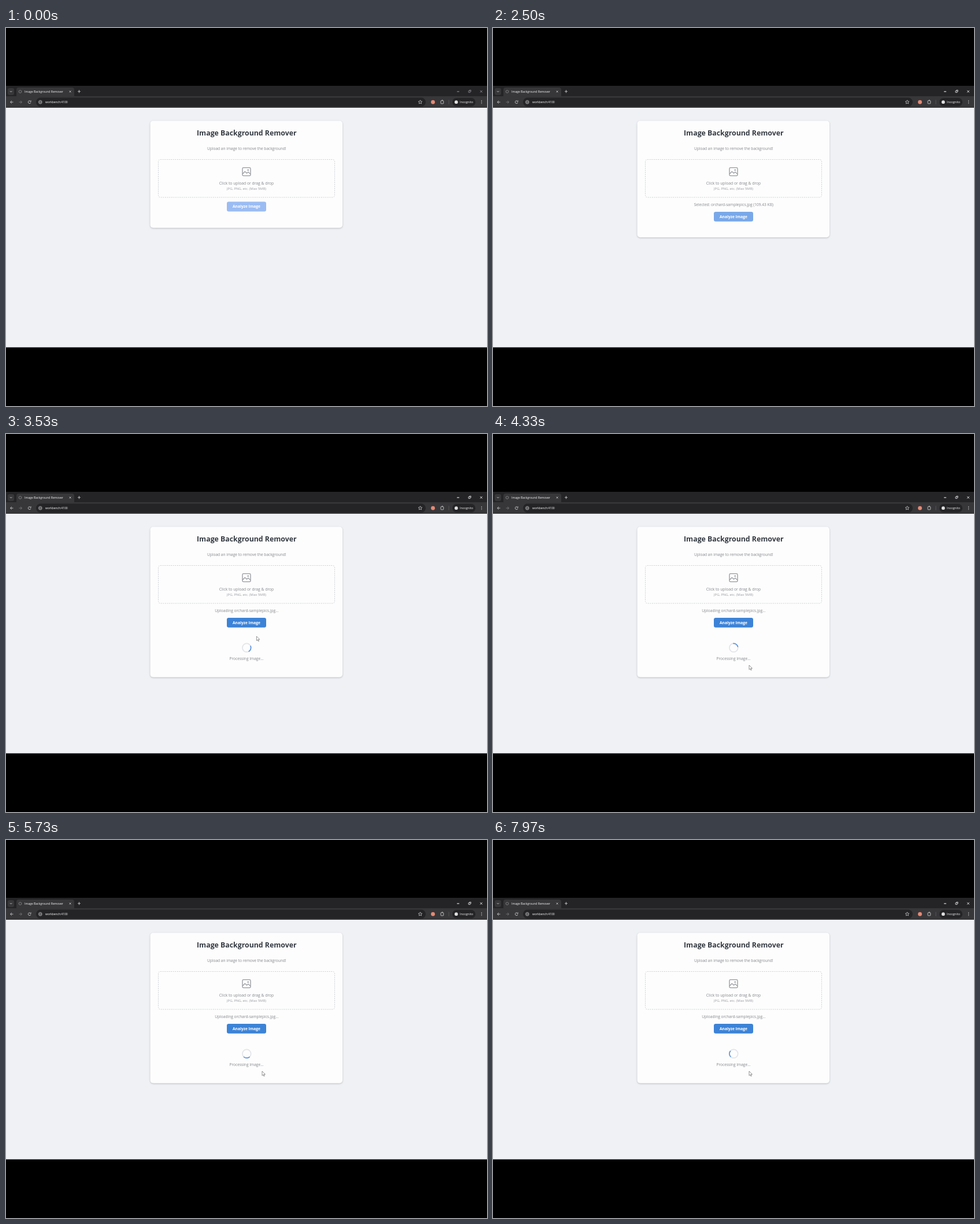
An HTML page with a canvas that plays this animation: 832x654 px, repeating every 8 s.

```html
<!DOCTYPE html>
<html lang="en">
<head>
<meta charset="utf-8">
<title>Image Background Remover</title>
<style>
html, body { margin: 0; width: 100%; height: 100%; overflow: hidden; background: #000; }
canvas { display: block; }
</style>
</head>
<body>
<canvas id="stage" width="832" height="654"></canvas>
<script>
const ctx = document.getElementById('stage').getContext('2d');
const LOOP = 8000;
const CHOSEN = 2430;   // file picked
const CLICK = 3230;    // upload starts
const FILE = 'orchard-samplepics.jpg';
const STRIP = '#242427';
const BAR = '#37373a';
const GREY = '#85878c';
const ICON = '#c8c8c8';

const clamp = v => Math.max(0, Math.min(1, v));
const progress = (t, from, to) => clamp((t - from) / (to - from));
const ease = p => p * p * (3 - 2 * p);
const mix = (a, b, p) => `rgb(${a.map((v, i) => Math.round(v + (b[i] - v) * p))})`;

function box(x, y, w, h, r, color) {
  ctx.beginPath();
  ctx.roundRect(x, y, w, h, r);
  ctx.fillStyle = color;
  ctx.fill();
}

function frame(x, y, w, h, r, color, width = 1) {
  ctx.beginPath();
  ctx.roundRect(x, y, w, h, r);
  ctx.strokeStyle = color;
  ctx.lineWidth = width;
  ctx.stroke();
}

function line(points, color, width = 1) {
  ctx.beginPath();
  points.forEach(([x, y], i) => i ? ctx.lineTo(x, y) : ctx.moveTo(x, y));
  ctx.strokeStyle = color;
  ctx.lineWidth = width;
  ctx.stroke();
}

function arc(x, y, r, color, width = 1, from = 0, to = Math.PI * 2) {
  ctx.beginPath();
  ctx.arc(x, y, r, from, to);
  ctx.strokeStyle = color;
  ctx.lineWidth = width;
  ctx.stroke();
}

function dot(x, y, r, color) {
  ctx.beginPath();
  ctx.arc(x, y, r, 0, Math.PI * 2);
  ctx.fillStyle = color;
  ctx.fill();
}

function text(str, x, y, size, color, weight = 400, align = 'center') {
  ctx.font = `${weight} ${size}px "Open Sans", "Noto Sans", sans-serif`;
  ctx.textAlign = align;
  ctx.fillStyle = color;
  ctx.fillText(str, x, y);
}

function cross(x, y, r, color) {
  line([[x - r, y - r], [x + r, y + r]], color, 0.8);
  line([[x + r, y - r], [x - r, y + r]], color, 0.8);
}

function arrow(x, y, dir, color) {
  line([[x - 2.5, y], [x + 2.5, y]], color, 0.9);
  line([[x, y - 2.4], [x + 2.5 * dir, y], [x, y + 2.4]], color, 0.9);
}

function star(x, y, r, color) {
  const pts = [];
  for (let i = 0; i <= 10; i++) {
    const a = i * Math.PI / 5 - Math.PI / 2;
    const d = i % 2 ? r * 0.48 : r;
    pts.push([x + d * Math.cos(a), y + d * Math.sin(a)]);
  }
  line(pts, color, 0.8);
}

function drawBrowser(t) {
  box(0, 100, 832, 18, 0, STRIP);
  box(3, 104, 11, 12, 3, BAR);
  line([[6.8, 109], [8.6, 110.8], [10.4, 109]], ICON, 0.9);

  box(0, 118, 832, 20, 0, BAR);
  box(18, 103, 100, 15, [4, 4, 0, 0], BAR);
  arc(24.5, 110, 2.3, '#858588', 0.9);
  text('Image Background Remover', 32, 112, 5.1, '#f4f4f4', 400, 'left');
  cross(111, 110, 1.5, ICON);
  line([[124, 109.8], [129, 109.8]], ICON, 0.9);
  line([[126.5, 107.3], [126.5, 112.3]], ICON, 0.9);

  const control = t < CHOSEN ? '#99999c' : '#fff';
  line([[780, 110], [784, 110]], control);
  frame(800, 108.6, 3, 3, 0.4, control, 0.8);
  line([[801.3, 107.4], [804.2, 107.4], [804.2, 110.3]], control, 0.7);
  cross(822, 109.8, 1.9, control);

  arrow(10, 128.2, -1, ICON);
  arrow(25, 128.2, 1, '#77777a');
  arc(40.7, 128.2, 2.4, ICON, 0.9, 0.3, 5.5);
  line([[43.2, 125.3], [43.2, 127.3], [41.2, 127.3]], ICON, 0.8);

  box(52, 120.5, 674, 15.5, 7.7, STRIP);
  dot(59.3, 128.2, 4.2, BAR);
  arc(59.3, 128.2, 2.6, ICON, 0.8);
  line([[58, 128.2], [60.6, 128.2]], ICON, 0.8);
  text('workbench:4100', 68, 130.2, 5, '#fff', 400, 'left');

  star(716.5, 128.2, 3.4, ICON);
  dot(738.5, 128.2, 3.4, '#e58a74');
  frame(752, 125.7, 4.8, 5.2, 0.8, ICON, 0.9);
  box(753.8, 124.2, 1.8, 1.8, 0.8, ICON);
  line([[766, 124.5], [766, 132]], '#5b5b5e', 0.8);
  box(772, 121, 40, 14.5, 7.2, STRIP);
  dot(778.8, 128.2, 2.9, '#dedede');
  text('Incognito', 785, 130, 5.3, '#f4f4f4', 400, 'left');
  for (let i = -1; i <= 1; i++) dot(822.6, 128.2 + i * 2.4, 0.7, ICON);
}

function drawCard(bottom) {
  ctx.save();
  ctx.shadowColor = 'rgba(0, 0, 0, .22)';
  ctx.shadowBlur = 3;
  ctx.shadowOffsetY = 1;
  box(249.5, 160.5, 332.5, bottom - 160.5, 5, '#fdfdfd');
  ctx.restore();

  text('Image Background Remover', 416.3, 186.3, 12.32, '#343a42', 700);
  text('Upload an image to remove the background!', 416.3, 210.8, 6.58, GREY);

  ctx.setLineDash([2, 1.6]);
  frame(263.5, 227.5, 305, 65.5, 3.5, '#cdd0d5');
  ctx.setLineDash([]);

  frame(409, 241.7, 14, 14, 1.8, '#95989e', 1.3);
  line([[409.2, 252.5], [413.2, 248.3], [416.5, 251.2], [419, 249], [422.8, 252.8]], '#95989e', 1.2);
  dot(418.7, 245.8, 1.2, '#95989e');
  text('Click to upload or drag & drop', 416, 270.8, 6.78, GREY);
  text('JPG, PNG, etc. (Max 5MB)', 416, 279.8, 5.88, '#989aa0');
}

function buttonColor(t) {
  const off = [155, 188, 243], on = [60, 131, 215], hover = [38, 102, 186];
  if (t < 2800) return mix(off, on, progress(t, CHOSEN, CHOSEN + 200));
  if (t < 3330) return mix(on, hover, progress(t, 2850, 3030));
  return mix(hover, on, progress(t, 3330, 3530));
}

function drawButton(t, y) {
  box(382, y, 68, 16.8, 3.2, buttonColor(t));
  text('Analyze Image', 416, y + 10.8, 6.63, '#fff', 700);
}

function drawSpinner(t) {
  const top = (t - CLICK) / 1000 * Math.PI * 2 - Math.PI / 2;
  arc(416.3, 369.8, 7.4, '#e3e5ea', 1.7);
  arc(416.3, 369.8, 7.4, '#5a94e0', 1.7, top - Math.PI / 4, top + Math.PI / 4);
  text('Processing Image...', 416, 390.7, 6.6, GREY);
}

function drawPointer(x, y, hand) {
  const shape = hand
    ? [[0, 0], [1.4, 0], [1.6, 3], [4.7, 4], [4.6, 6.6], [3.6, 9], [0.2, 9], [-1.8, 5.8], [-1.2, 5], [0, 5.8]]
    : [[0, 0], [0, 7.6], [1.8, 6], [3, 8.7], [4.2, 8.2], [3, 5.6], [5.4, 5.4]];
  ctx.beginPath();
  shape.forEach(([dx, dy]) => ctx.lineTo(x + dx, y + dy));
  ctx.closePath();
  ctx.fillStyle = '#fff';
  ctx.fill();
  ctx.strokeStyle = hand ? '#303030' : '#666';
  ctx.lineWidth = 0.7;
  ctx.stroke();
}

function drawCursor(t) {
  if (t < 2600) return;
  const come = ease(progress(t, 2600, 3030));
  const leave = ease(progress(t, 3260, 3930));
  const x = 466 - 38 * come + 15 * leave;
  const y = 302 + 20 * come + 78 * leave;
  drawPointer(x, y, y > 317 && y < 335 && x < 450);
}

function draw(t) {
  const chosen = t >= CHOSEN, busy = t >= CLICK;
  ctx.fillStyle = '#000';
  ctx.fillRect(0, 0, 832, 654);
  box(0, 138, 832, 414.5, 0, '#eff1f5');
  drawBrowser(t);
  drawCard(busy ? 420.8 : chosen ? 362.3 : 345.8);
  if (chosen) {
    const label = busy ? `Uploading ${FILE}...` : `Selected: ${FILE} (109.43 KB)`;
    text(label, 416.3, 308, 6.6, GREY);
  }
  drawButton(t, chosen ? 318 : 300.6);
  if (busy) drawSpinner(t);
  drawCursor(t);
}

const start = performance.now();
function tick() {
  draw((performance.now() - start) % LOOP);
  requestAnimationFrame(tick);
}
tick();
</script>
</body>
</html>
```
